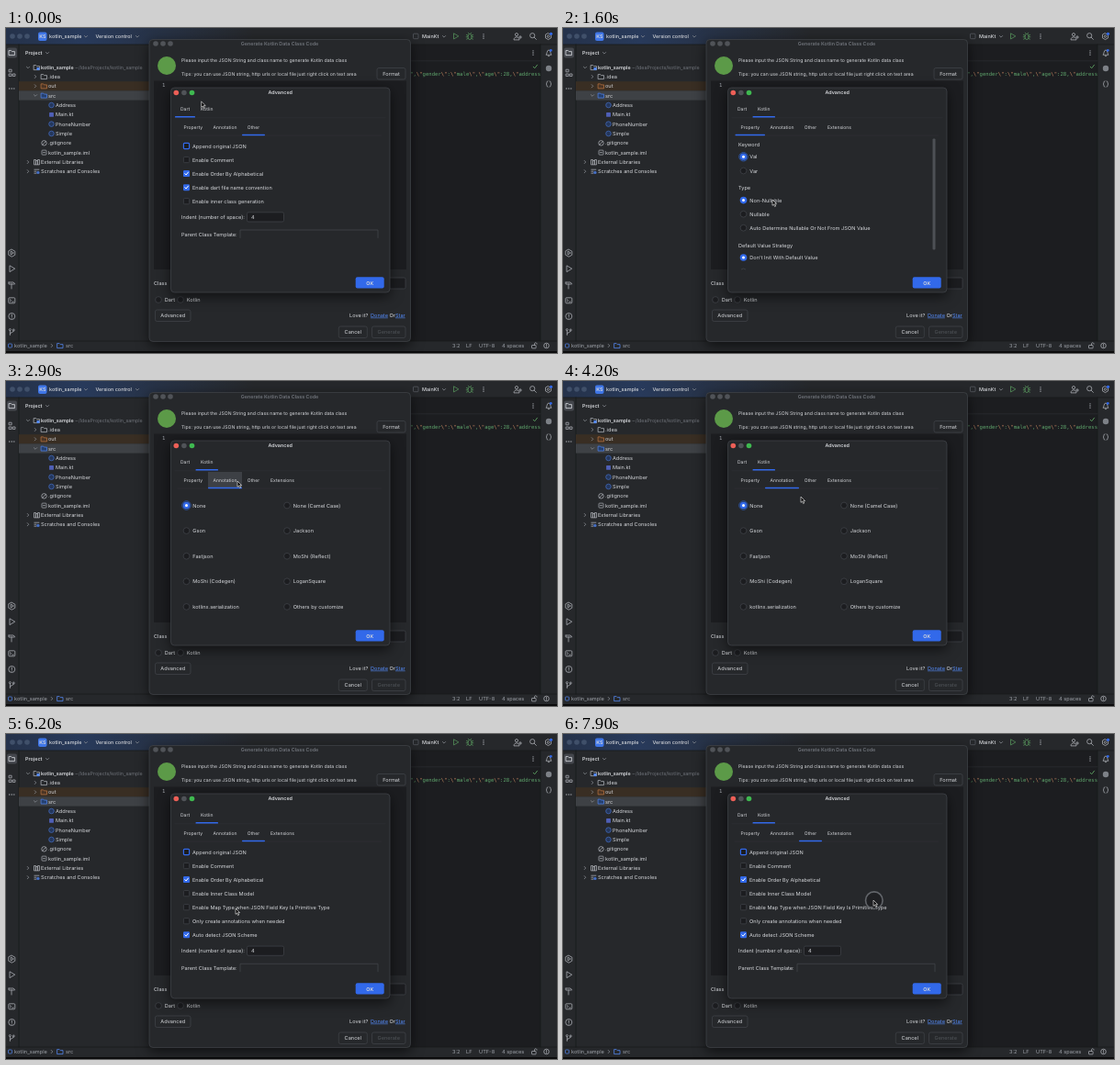
An HTML page for the animation above (8 s loop, 600 by 354 pixels).

```html
<!DOCTYPE html>
<html lang="en">
<head>
<meta charset="utf-8">
<title>Data class generator settings</title>
<style>
html, body { margin: 0; width: 100%; height: 100%; overflow: hidden; background: #1c1d20; }
svg { display: block; width: 600px; height: 354px; }
/* Text is laid out ten times larger and scaled down, for exact letter spacing. */
text { font: 56px Inter, "Open Sans", sans-serif; fill: #d5d7db; text-rendering: geometricPrecision; white-space: pre; }
.small { font-size: 51.5px; }
.tab { font-size: 50.5px; }
.top { font-size: 54.5px; font-weight: 500; }
.bold { font-size: 54px; font-weight: 600; }
.code { font: 56.2px "DejaVu Sans Mono", "Noto Sans Mono", monospace; fill: #5fa56c; }
.esc { fill: #c98a63; }
.dim { fill: #6f737a; }
.off { fill: #505459; }
.gray { fill: #a0a4ab; }
.link { fill: #548af7; text-decoration: underline; }
.mid { text-anchor: middle; }
.line { fill: none; stroke: #b0b3ba; stroke-width: .75; stroke-linecap: round; stroke-linejoin: round; }
.shadow { filter: drop-shadow(0 4px 7px rgba(0, 0, 0, .6)); }
</style>
</head>
<body>
<svg id="stage" viewBox="0 0 600 354"></svg>
<script>
const PANEL = '#26282b', EDITOR = '#1c1d20', EDGE = '#43464b', BLUE = '#3269ea', ICON = '#b0b3ba';

// Drawing helpers; text is placed by its vertical centre.
const text = (x, y, s, cls = '') =>
  `<text transform="translate(${x} ${y + 2}) scale(.1)" class="${cls}">${s}</text>`;
const box = (x, y, w, h, fill, r = 0, stroke = 'none', sw = .7) =>
  `<rect x="${x}" y="${y}" width="${w}" height="${h}" rx="${r}" fill="${fill}" stroke="${stroke}" stroke-width="${sw}"/>`;
const dot = (x, y, r, fill, stroke = 'none', sw = .7) =>
  `<circle cx="${x}" cy="${y}" r="${r}" fill="${fill}" stroke="${stroke}" stroke-width="${sw}"/>`;
const line = (d, style = '') => `<path class="line" d="${d}" style="${style}"/>`;
const ring = (x, y, r) => dot(x, y, r, 'none', ICON, .75);
const lights = (x, y, step, colors) => colors.map((c, i) => dot(x + i * step, y, 2.8, c)).join('');
const chevron = (x, y, open = true) =>
  line(open ? `M${x - 1.6} ${y - .8}l1.6 1.6 1.6-1.6` : `M${x - .8} ${y - 1.6}l1.6 1.6-1.6 1.6`, 'stroke:#8b8f96');
const more = (x, y, dx, dy) => [-1, 0, 1].map(i => dot(x + i * dx, y + i * dy, .65, ICON)).join('');
const folder = (x, y, color = ICON, fill = 'none') =>
  line(`M${x - 3} ${y - 2.4}h2.2l1 1h2.8v4h-6z`, `stroke:${color};fill:${fill}`);
const button = (x, y, w, h, label, cls = '') =>
  box(x, y, w, h, PANEL, 2, EDGE) + text(x + w / 2, y + h / 2, label, 'mid ' + cls);
const dialog = (x, y, w, h) => `<g class="shadow">${box(x, y, w, h, PANEL, 4, EDGE)}</g>`;

// state: 0 off, 1 on, 2 focused
const radio = (x, y, label, state = 0) =>
  (state === 2 ? dot(x, y, 4.7, 'none', '#2c57ad', 1) : '') +
  (state ? dot(x, y, 3.8, BLUE) + dot(x, y, 1.5, '#fff') : dot(x, y, 3.4, EDITOR, '#44474c')) +
  text(x + 6.8, y, label);
const check = (y, label, state = 0) =>
  (state === 1
    ? box(193, y - 3.5, 7, 7, BLUE, 1.2) + line(`M194.8 ${y}l1.3 1.4 2.3-2.9`, 'stroke:#fff;stroke-width:1')
    : box(193.4, y - 3.1, 6.2, 6.2, EDITOR, 1, state ? BLUE : '#44474c', state ? 1.2 : .7)) +
  text(203, y, label);

function treeRow(x, y, label, icon, arrow, cls = '') {
  const arrows = { open: chevron(x - 14, y), shut: chevron(x - 14, y, false) };
  return (arrows[arrow] || '') + icon(x - 4.5, y) + text(x, y, label, cls);
}

function ide() {
  const classIcon = (x, y) => dot(x, y, 2.8, '#24375c', '#456fc4');
  const plainIcon = (x, y) => box(x - 2.4, y - 2.4, 4.8, 4.8, '#4f5fb8', .5);
  const fileIcon = (x, y) => box(x - 2.5, y - 2.5, 5, 5, 'none', .8, ICON) + line(`M${x - 1} ${y}h2`);
  const ignoreIcon = (x, y) => ring(x, y, 2.7) + line(`M${x - 1.8} ${y + 1.8}l3.6-3.6`);
  const libIcon = (x, y) => line(`M${x - 3} ${y + 2.5}v-5h2v5zm2 0v-4h2v4zm2 0v-5h2v5z`);
  const scratchIcon = (x, y) => line(`M${x - 2.6} ${y - 2}h5M${x - 2.6} ${y}h2M${x - 2.6} ${y + 2}h2`) + dot(x + 1.4, y + 1.2, 1.7, '#456fc4');
  const gear = (x, y) => ring(x, y, 1.2) + line(`M${x} ${y - 3.4}l3 1.7v3.4l-3 1.7-3-1.7v-3.4z`);
  const bug = line('M503 9a2 2.6 0 0 1 4 0v1a2 2.6 0 0 1-4 0zM501.4 7.4l1.6.8M501.2 9.7h1.8M501.6 12.2l1.5-.8M508.6 7.4l-1.6.8M508.8 9.7h-1.8M508.4 12.2l-1.5-.8M504 6l-.6-.8M506 6l.6-.8', 'stroke:#57965c');

  return `<defs><linearGradient id="glow"><stop stop-color="#25324a"/><stop offset=".14" stop-color="#283a5b"/><stop offset=".45" stop-color="${PANEL}"/></linearGradient></defs>` +
    box(0, 0, 600, 354, EDITOR) + box(0, 18, 158, 324, PANEL) + box(582, 18, 18, 324, PANEL) +
    box(0, 0, 600, 18, 'url(#glow)') + box(0, 341, 600, 11, PANEL) + box(0, 352, 600, 2, '#0b0b0c') +
    line('M0 18H600M14 18V341M582 18V341M0 341H600', 'stroke:#17181a') +
    // Toolbar
    lights(7, 9, 8, ['#40506a', '#40506a', '#40506a']) +
    box(35, 4.5, 9.5, 9.5, '#3f76e8', 2) + text(39.8, 9.2, 'KS', 'mid bold') +
    text(47, 9, 'kotlin_sample', 'top') + chevron(87, 9.3) + text(97.5, 9, 'Version control', 'top') + chevron(143, 9.3) +
    box(443.5, 6.2, 5.5, 5.5, 'none', .8, '#5d6167') + text(453, 9, 'MainKt', 'top') + chevron(477, 9.3) +
    line('M487.5 6.2v5.8l5-2.9z', 'stroke:#57965c') + bug + more(520, 9, 0, 2.2) +
    ring(556, 7.2, 1.6) + line('M553 12.5c0-3.6 6-3.6 6 0zM560 8.5v3M558.5 10h3') +
    ring(573.2, 8.2, 2.6) + line('M575.2 10.2l2.2 2.2') + gear(590.5, 9.2) + dot(593.5, 6.3, 1.6, BLUE) +
    // Left strip
    box(1, 21.5, 11, 11, '#44474d', 2) + folder(6.4, 27, '#e1e3e8') +
    line('M3.5 45.2h2.6v2.6H3.5zM3.5 50h2.6v2.4H3.5zM7.6 50h2.4v2.4H7.6z') + more(6.3, 66, 2.5, 0) +
    line('M6.3 241.2l3.5 2v4l-3.5 2-3.5-2v-4zM5.3 243.4v3.6l2.7-1.8z') +
    line('M4 259.2v6.4l5.4-3.2z') + line('M3 277h5l1.8 1.6M3 277v2h6M6 279v5') +
    box(2.8, 293.8, 7, 6, 'none', 1, ICON, .75) + line('M4.3 295.6l1.3 1.2-1.3 1.2M6.8 298.2h1.6') +
    ring(6.3, 314, 3.5) + line('M6.3 312v2.4M6.3 316v.1') +
    ring(4.4, 328.6, 1) + ring(8.3, 329, 1) + line('M4.4 329.6v4.8M8.3 330c0 2-3.9 1.2-3.9 3') +
    // Project tree
    text(21, 27, 'Project', 'bold') + chevron(45, 27.3) +
    box(14, 58.2, 144, 10.2, '#392e23') + box(14, 68.4, 144, 10.2, '#3e4145') +
    treeRow(38, 43, 'kotlin_sample <tspan class="dim" style="font-weight:400">~/IdeaProjects/kotlin_sample</tspan>', (x, y) => folder(x, y) + box(x, y, 3, 3, '#548af7', .4), 'open', 'bold') +
    treeRow(46, 53, '.idea', (x, y) => folder(x, y), 'shut') +
    treeRow(46, 63.3, 'out', (x, y) => folder(x, y, '#b87340', '#4b3525'), 'shut') +
    treeRow(46, 73.5, 'src', (x, y) => folder(x, y, '#4f82e8', '#25406f'), 'open') +
    treeRow(54, 84, 'Address', classIcon) + treeRow(54, 94.3, 'Main.kt', plainIcon) +
    treeRow(54, 104.6, 'PhoneNumber', classIcon) + treeRow(54, 115, 'Simple', classIcon) +
    treeRow(46, 125.3, '.gitignore', ignoreIcon) + treeRow(46, 135.6, 'kotlin_sample.iml', fileIcon) +
    treeRow(38, 146, 'External Libraries', libIcon, 'shut') +
    treeRow(38, 156.2, 'Scratches and Consoles', scratchIcon, 'shut') +
    // Editor and right strip
    line('M441 35.8H582', 'stroke:#2c2e32') + more(574, 27, 0, 2.2) + line('M574.2 42.2l1.5 1.6 2.8-3.6', 'stroke:#57965c;stroke-width:1') +
    text(440, 50, '",\\"gender\\":\\"male\\",\\"age\\":28,\\"address'.replace(/\\"/g, '<tspan class="esc">$&</tspan>'), 'code') +
    line('M588.3 29c1-1 .6-5 2.7-5s1.7 4 2.7 5zM590.3 30.6h1.4') + dot(593.3, 24.4, 1.4, BLUE) +
    dot(591, 44, 3.2, '#7d8187') +
    line('M590 57.8c-2 0-.3 3-2 3.2 1.7.2 0 3.2 2 3.2M592 57.8c2 0 .3 3 2 3.2-1.7.2 0 3.2-2 3.2') +
    // Status bar
    box(2.5, 344, 4, 4, 'none', .8, '#548af7') + text(9, 346, 'kotlin_sample', 'gray') + chevron(50, 346, false) +
    folder(59, 346, '#548af7') + text(65, 346, 'src', 'gray') +
    text(486, 346, '3:2', 'gray') + text(501, 346, 'LF', 'gray') + text(515, 346, 'UTF-8', 'gray') + text(540, 346, '4 spaces', 'gray') +
    box(572.5, 345.5, 4.6, 3.4, 'none', .5, ICON) + line('M575.5 345.3v-1.2c0-1.8 2.6-1.8 2.6 0') +
    ring(588.5, 346, 2.8) + line('M588.5 344.5v1.8M588.5 347.5v.1');
}

function generator() {
  return dialog(156, 12.5, 284.5, 329) +
    lights(163, 17, 8, ['#505358', '#505358', '#505358']) +
    text(298, 17, 'Generate Kotlin Data Class Code', 'bold mid dim') +
    dot(175, 41, 10, '#5c9a48') +
    text(191, 34.5, 'Please input the JSON String and class name to generate Kotlin data class', 'small') +
    text(191, 49.7, 'Tips: you can use JSON string, http urls or local file just right click on text area', 'small') +
    button(404, 43.5, 31, 12.5, 'Format') +
    box(161, 57.5, 275, 205.5, EDITOR) + text(170, 62.2, '1', 'code gray') +
    text(161, 278, 'Class') + box(205, 272, 230, 12, EDITOR, 1.5, EDGE) +
    radio(166, 296, 'Dart') + radio(190, 296, 'Kotlin') +
    button(162.5, 307, 38.5, 12.5, 'Advanced') +
    text(374, 313.3, 'Love it?') + text(397, 313.3, 'Donate', 'link') + text(417.5, 313.3, 'Or') + text(424, 313.3, 'Star', 'link') +
    button(362.3, 325, 31, 12.5, 'Cancel') + button(398.5, 325, 36.5, 12.5, 'Generate', 'off');
}

const mainTabs = [['Dart', 184, 206], ['Kotlin', 206.5, 231]];
const subTabs = [['Property', 187.5, 220], ['Annotation', 220, 257], ['Other', 257, 282], ['Extensions', 282, 320]];

const tabs = (list, y, active) => list.map(([name, a, b], i) =>
  text((a + b) / 2, y, name, 'tab mid') + (i === active ? box(a, y + 7.8, b - a, 1.4, BLUE, .6) : '')).join('');

const fields = y => text(191, y, 'Indent (number of space):') + box(262.5, y - 5.2, 40, 10.2, EDITOR, 1.5, EDGE) + text(267, y, '4') +
  text(191, y + 19, 'Parent Class Template:') + line(`M255 ${y + 22.5}v-8.5h150v8.5`, `stroke:${EDGE}`);

const checks = list => list.map(([label, state], i) => check(128.5 + 15.05 * i, label, state)).join('');

const shared = [['Append original JSON', 2], ['Enable Comment'], ['Enable Order By Alphabetical', 1]];

function property() {
  return text(191, 127, 'Keyword') + radio(196.5, 140.3, 'Val', 2) + radio(196.5, 155.5, 'Var') +
    text(191, 174.3, 'Type') + radio(196.5, 187.6, 'Non-Nullable', 1) + radio(196.5, 202.7, 'Nullable') +
    radio(196.5, 217.7, 'Auto Determine Nullable Or Not From JSON Value') +
    text(191, 236.8, 'Default Value Strategy') + radio(196.5, 250, 'Don\'t Init With Default Value', 1) +
    line('M194.3 262.8q2.2-2 4.4 0', 'stroke:#44474c') + box(402.5, 120.5, 3, 121, '#4d5055', 1);
}

function annotation() {
  return ['None', 'None (Camel Case)', 'Gson', 'Jackson', 'Fastjson', 'MoShi (Reflect)', 'MoShi (Codegen)',
    'LoganSquare', 'kotlinx.serialization', 'Others by customize'].map((label, i) =>
    radio(i % 2 ? 306 : 196.5, 135.5 + 27.6 * (i >> 1), label, i ? 0 : 2)).join('');
}

const panes = [
  { at: 0, main: 0, sub: 2, body: checks([...shared, ['Enable dart file name convention', 1], ['Enable inner class generation']]) + fields(206) },
  { at: 300, main: 1, sub: 0, body: property() },
  { at: 2800, main: 1, sub: 1, body: annotation() },
  { at: 5000, main: 1, sub: 2, body: checks([...shared, ['Enable Inner Class Model'], ['Enable Map Type when JSON Field Key Is Primitive Type'],
    ['Only create annotations when needed'], ['Auto detect JSON Scheme', 1]]) + fields(236.3) },
];

const settings = dialog(179.5, 65, 238.5, 223) +
  lights(185.3, 70.5, 8.6, ['#ec5f57', '#505358', '#3fb950']) +
  text(298.7, 70.3, 'Advanced', 'bold mid') +
  line('M184 97.8H413M187 117H409', 'stroke:#303236;stroke-width:.6') +
  box(380.7, 271.3, 31, 12.2, BLUE, 2) + text(396.3, 277.5, 'OK', 'mid bold');

const paneMarkup = ({ main, sub, body }) =>
  `<g class="pane">${tabs(mainTabs, 88.3, main)}${tabs(main ? subTabs : subTabs.slice(0, 3), 108, sub)}${body}</g>`;

const stage = document.getElementById('stage');
stage.innerHTML = ide() + generator() + settings + '<rect id="hover" fill="#3d4045"/>' + panes.map(paneMarkup).join('') +
  `<g id="cursor"><circle id="press" cx=".8" cy=".2" r="9.3" fill="#000" fill-opacity=".18" stroke="#62656a" stroke-width="1.6"/>
  <path d="M0 0v6.3l1.5-1.3 1.1 2.5 1.1-.5-1.1-2.4h2z" fill="#0a0a0a" stroke="#e8e8e8" stroke-width=".65"/></g>`;

const [hover, cursor, press] = ['hover', 'cursor', 'press'].map(id => document.getElementById(id));
const paneNodes = [...stage.querySelectorAll('.pane')];

// Pointer path: time, x, y
const path = [[0, 212.7, 80], [200, 217, 88], [400, 218, 89], [800, 229, 187.5], [1600, 228, 187], [2000, 228, 187],
  [2500, 251, 110], [2900, 252, 109], [3100, 252, 109], [3700, 259, 126], [4600, 259, 126], [4900, 268, 108],
  [5300, 268, 108], [6000, 250, 190], [6400, 250, 190], [7700, 338, 181], [8000, 338, 181]];

function pointer(t) {
  const i = path.findIndex(p => p[0] > t);
  const [t0, x0, y0] = path[i - 1], [t1, x1, y1] = path[i];
  const u = (t - t0) / (t1 - t0), e = u * u * (3 - 2 * u);
  return [x0 + (x1 - x0) * e, y0 + (y1 - y0) * e];
}

function showHover(x, y) {
  const [list, top, h] = y > 98 ? [subTabs, 99, 17.5] : [mainTabs, 82, 15.5];
  const tab = y >= top && y < top + h && list.find(([, a, b]) => x >= a && x < b);
  hover.style.display = tab ? '' : 'none';
  if (!tab) return;
  const attrs = { x: tab[1], y: top, width: tab[2] - tab[1], height: h };
  for (const key in attrs) hover.setAttribute(key, attrs[key]);
}

function draw(now) {
  const t = now % 8000, [x, y] = pointer(t);
  const current = panes.filter(p => p.at <= t).length - 1;
  paneNodes.forEach((node, i) => node.style.display = i === current ? '' : 'none');
  cursor.setAttribute('transform', `translate(${x} ${y})`);
  press.style.display = t >= 7800 ? '' : 'none';
  showHover(x, y);
}

const start = performance.now();
function loop() {
  draw(performance.now() - start);
  requestAnimationFrame(loop);
}
loop();
</script>
</body>
</html>
```
